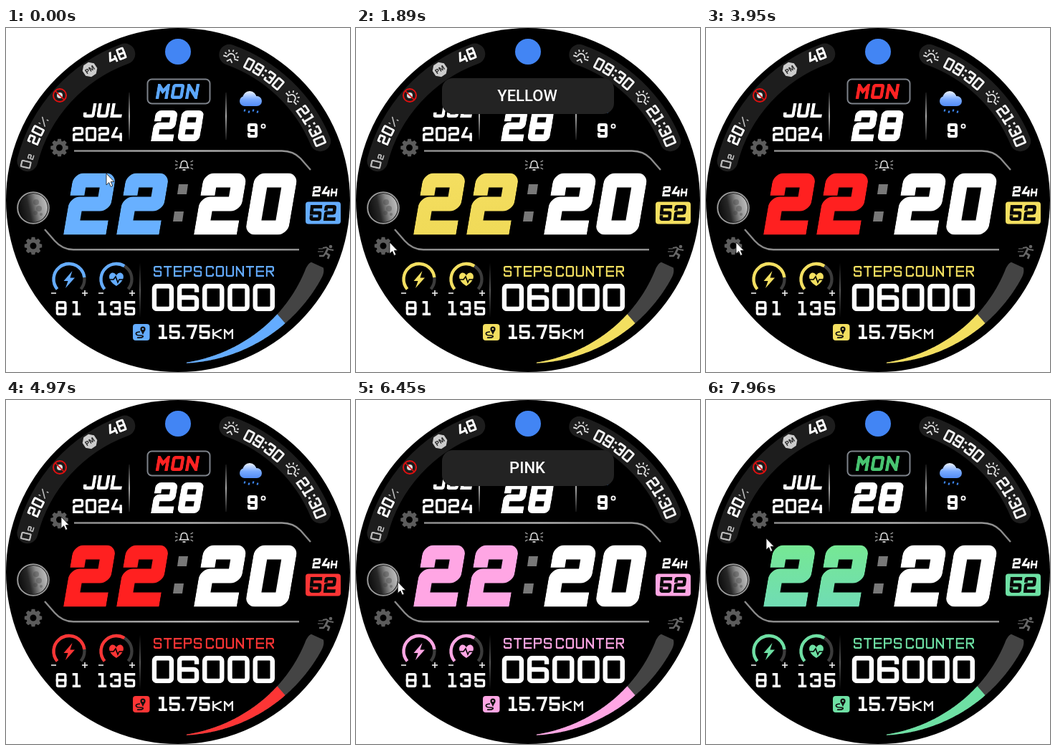
Write an HTML page with a canvas that moves like this. It is 480 px wide and 480 px high and loops after 8 s.

```html
<!DOCTYPE html>
<html lang="en">
<head>
<meta charset="utf-8">
<title>Watch face</title>
<style>
html, body { margin: 0; width: 100%; height: 100%; overflow: hidden; background: #fff; }
canvas { display: block; width: 480px; height: 480px; }
</style>
</head>
<body>
<canvas id="face" width="480" height="480"></canvas>
<script>
const ctx = document.getElementById('face').getContext('2d');
const LOOP = 8000, TAU = Math.PI * 2, RAD = Math.PI / 180;

// Each theme: clock top, clock bottom, weekday, accent.
const THEMES = {
  blue: ['#68b0ff', '#68b0ff', '#5ba6fa', '#64acff'],
  yellow: ['#f4de60', '#f0da58', '#f2dc5c', '#f3df60'],
  red: ['#ff2020', '#ff2020', '#ff2222', '#fd3535'],
  pink: ['#ffa6e4', '#ffa6e4', '#f7a4e2', '#ffa6e4'],
  green: ['#76e894', '#70dcb4', '#48c470', '#6ee0a4']
};
const CLOCK = [[0, 'blue'], [670, 'yellow'], [3050, 'red'], [5030, 'pink'], [6750, 'green']];
const ACCENT = [[0, 'blue'], [1890, 'yellow'], [4010, 'red'], [5890, 'pink'], [7500, 'green']];
const TOAST = [[0, ''], [730, 'YELLOW'], [2990, ''], [3050, 'RED'], [3950, ''], [4010, 'RED'],
  [4970, ''], [5030, 'PINK'], [5830, ''], [5890, 'PINK'], [6690, ''], [6750, 'GREEN'],
  [7440, ''], [7500, 'GREEN'], [7960, '']];
const POINTER = [[0, 140, 203], [60, 140, 203], [310, 78, 169], [1050, 78, 168], [1450, 42, 225],
  [1830, 47, 299], [2130, 47, 299], [2450, 104, 220], [2870, 74, 153], [3230, 74, 153],
  [3770, 42, 299], [4190, 42, 299], [4670, 64, 152], [4790, 77, 157], [4970, 77, 163],
  [5210, 77, 163], [5770, 37, 302], [5890, 37, 302], [6130, 48, 290], [6310, 48, 290],
  [6690, 81, 173], [7110, 81, 173], [7400, 38, 298], [7600, 38, 298], [7960, 84, 193]];

// Pen strokes over a 3x3 keypad; a-f are extra stops on the sides, "!" keeps a corner square.
const GLYPHS = {
  0: '239712', 1: '12!8 79', 2: 'a13647!9', 3: 'a1397c 56', 4: '2e!f 69', 5: '31!4!697c',
  6: 'b317964', 7: '13!8', 8: '239712 46', 9: 'c793146', C: 'b3179d', E: '31!7!9 46',
  H: '17 39 46', J: '397c', K: '17 34!9', L: '17!9', M: '71!5!3!9', N: '71!9!3', O: '239712',
  P: '71!364', R: '71!364 59', S: 'b314697c', T: '13 28', U: '1793', '%': '37 1a 9d'
};
const SIDES = { a: [0, .17], b: [1, .17], c: [0, .83], d: [1, .83], e: [0, .72], f: [1, .72] };
const node = k => SIDES[k] || [(k - 1) % 3 / 2, Math.floor((k - 1) / 3) / 2];

const valueAt = (list, t) => list.filter(e => e[0] <= t).pop()[1];

function placed(x, y, angle, draw) {
  ctx.save();
  ctx.translate(x, y);
  ctx.rotate(angle * RAD);
  draw();
  ctx.restore();
}

function line(points, color, width) {
  ctx.beginPath();
  points.forEach(p => ctx.lineTo(p[0], p[1]));
  ctx.strokeStyle = color;
  ctx.lineWidth = width;
  ctx.stroke();
}

function shape(points, color) {
  ctx.beginPath();
  points.forEach(p => ctx.lineTo(p[0], p[1]));
  ctx.fillStyle = color;
  ctx.fill();
}

function disc(x, y, r, color) {
  ctx.beginPath();
  ctx.arc(x, y, r, 0, TAU);
  ctx.fillStyle = color;
  ctx.fill();
}

function arc(x, y, r, from, to, color, width) {
  ctx.beginPath();
  ctx.arc(x, y, r, from * RAD, to * RAD);
  ctx.strokeStyle = color;
  ctx.lineWidth = width;
  ctx.stroke();
}

function box(x, y, w, h, r, color) {
  ctx.beginPath();
  ctx.roundRect(x, y, w, h, r);
  ctx.fillStyle = color;
  ctx.fill();
}

function fade(x0, y0, x1, y1, ...stops) {
  const g = ctx.createLinearGradient(x0, y0, x1, y1);
  stops.forEach((c, i) => g.addColorStop(i / (stops.length - 1), c));
  return g;
}

function glyphWidth(c, w, pen) {
  if (c === ' ') return 0;
  return c === '.' || c === ':' ? pen : c === '1' ? w * .78 : w;
}

// Draws a glyph with its lower left corner at the origin.
function glyph(c, w, h, pen, color) {
  ctx.fillStyle = color;
  if (c === '.') ctx.fillRect(0, -pen, pen, pen);
  if (c === ':') [.2, .65].forEach(k => ctx.fillRect(0, -h * k - pen, pen, pen));
  if (!GLYPHS[c]) return;
  const width = glyphWidth(c, w, pen), radius = Math.max(.5, w * .24 - pen / 2);
  ctx.save();
  ctx.beginPath();
  ctx.rect(0, -h, width, h);
  ctx.clip();
  ctx.strokeStyle = color;
  ctx.lineWidth = pen;
  ctx.lineCap = 'square';
  for (const stroke of GLYPHS[c].split(' ')) {
    const stops = stroke.match(/.!?/g);
    const pts = stops.map(s => node(s[0]))
      .map(([u, v]) => [pen / 2 + u * (width - pen), -h + pen / 2 + v * (h - pen)]);
    ctx.beginPath();
    pts.forEach((p, i) => {
      const round = i > 0 && i < pts.length - 1 && !stops[i][1];
      if (round) ctx.arcTo(...p, ...pts[i + 1], radius);
      else ctx.lineTo(...p);
    });
    ctx.stroke();
  }
  ctx.restore();
}

function text(s, x, base, w, h, gap, pen, color, slant = 0) {
  ctx.save();
  ctx.transform(1, 0, -slant, 1, x, base);
  for (const c of s) {
    glyph(c, w, h, pen, color);
    ctx.translate(glyphWidth(c, w, pen) + gap, 0);
  }
  ctx.restore();
}

// Text centred on an angle of the bezel, each glyph turned with the arc.
function bezelText(s, angle, r, w, h, gap, pen, color) {
  const widths = [...s].map(c => glyphWidth(c, w, pen) + gap);
  let pos = -widths.reduce((a, b) => a + b) / 2;
  [...s].forEach((c, i) => {
    const a = angle + (pos + widths[i] / 2) / r / RAD;
    placed(240 + r * Math.cos(a * RAD), 240 + r * Math.sin(a * RAD), a + 90, () => {
      ctx.translate(-(widths[i] - gap) / 2, h / 2);
      glyph(c, w, h, pen, color);
    });
    pos += widths[i];
  });
}

function gear(x, y) {
  placed(x, y, 0, () => {
    for (let i = 0; i < 8; i++) {
      ctx.rotate(TAU / 8);
      shape([[-3.2, -8], [-2.3, -12.2], [2.3, -12.2], [3.2, -8]], '#5c5c5c');
    }
    arc(0, 0, 7, 0, 360, '#5c5c5c', 5);
  });
}

function sun(x, y, angle, dir) {
  placed(x, y, angle, () => {
    arc(0, 3, 5, 180, 360, '#ddd', 2);
    line([[-11, 4], [-5, 4]], '#ddd', 2);
    line([[5, 4], [11, 4]], '#ddd', 2);
    line([[-4, 8 - dir], [0, 8 + dir], [4, 8 - dir]], '#ddd', 1.8);
    for (let a = 200; a <= 340; a += 35) {
      const c = Math.cos(a * RAD), s = Math.sin(a * RAD);
      line([[c * 8, 3 + s * 8], [c * 11, 3 + s * 11]], '#ddd', 1.8);
    }
  });
}

function bezel() {
  ctx.lineCap = 'round';
  arc(240, 240, 217, 194.5, 250, '#1d1d1d', 29);
  arc(240, 240, 215, 289.5, 337.5, '#1d1d1d', 29);
  ctx.lineCap = 'butt';
  bezelText('48', 247, 219, 11.5, 17, 2.5, 3, '#fff');
  bezelText('20', 204.5, 218, 11.5, 17, 2.5, 3, '#fff');
  bezelText('%', 210.2, 217, 11, 11, 1, 1.6, '#bbb');
  bezelText('O', 193.2, 218, 11, 15, 1, 2.4, '#bbb');
  bezelText('2', 196.3, 214, 7, 9, 1, 1.8, '#bbb');
  bezelText('09:30', 304.2, 214, 12.3, 17, 2.2, 3, '#f2f2f2');
  bezelText('21:30', 331, 214, 12.6, 17, 2.5, 3, '#f2f2f2');
  sun(315, 38, 19, -2);
  sun(401, 96, 48, 2);

  placed(117, 58, -34, () => {
    const octagon = [...Array(8)].map((_, i) => (i + .5) * TAU / 8)
      .map(a => [10.5 * Math.cos(a), 10.5 * Math.sin(a)]);
    shape(octagon, '#ccc');
    ctx.fillStyle = '#222';
    ctx.font = 'bold 9px Roboto, sans-serif';
    ctx.fillText('PM', 0, .5);
  });

  disc(75, 94, 4, '#ddd');
  arc(75, 94, 9, 0, 360, '#e01010', 2);
  line([[69, 88], [81, 100]], '#e01010', 1.7);
  disc(240, 33, 18, '#4285f4');
}

function weather() {
  ctx.beginPath();
  ctx.arc(333, 102, 7, 0, TAU);
  ctx.arc(340, 97.5, 9.5, 0, TAU);
  ctx.arc(350, 102, 7, 0, TAU);
  ctx.rect(333, 101, 17, 8);
  ctx.fillStyle = fade(0, 88, 0, 111, '#eef4ff', '#79aaff', '#4b86f5');
  ctx.fill();
  [[333, 115], [339, 117], [345, 115], [351, 117]]
    .forEach(([x, y]) => line([[x + .5, y - 1.5], [x - .5, y + 1.5]], '#3d86f0', 2.2));
  text('9', 337, 153, 14, 20, 0, 4, '#fff');
  arc(359, 137, 2.6, 0, 360, '#fff', 1.8);
}

function bell() {
  ctx.beginPath();
  ctx.moveTo(242.5, 195);
  ctx.quadraticCurveTo(244.5, 193, 244.3, 189.5);
  ctx.bezierCurveTo(244.5, 184, 252.5, 184, 252.7, 189.5);
  ctx.quadraticCurveTo(252.5, 193, 254.5, 195);
  ctx.closePath();
  ctx.strokeStyle = '#ddd';
  ctx.lineWidth = 1.5;
  ctx.stroke();
  line([[246.5, 198], [250.5, 198]], '#ddd', 1.8);
  for (const side of [-1, 1])
    for (const dy of [-5, 0, 5])
      line([[248.5 + side * 9, 191 + dy * .8], [248.5 + side * 12.5, 191 + dy * 1.2]], '#aaa', 1.4);
}

function frameLines() {
  ctx.lineWidth = 2.4;
  ctx.strokeStyle = fade(92, 0, 426, 0, '#8a8a8a', '#b0b0b0', '#8a8a8a');
  ctx.beginPath();
  ctx.moveTo(95, 171.5);
  ctx.lineTo(385, 171.5);
  ctx.quadraticCurveTo(401, 171.5, 411, 182);
  ctx.lineTo(425, 198);
  ctx.stroke();
  ctx.beginPath();
  ctx.moveTo(54, 281);
  ctx.lineTo(68, 297);
  ctx.quadraticCurveTo(79, 309.3, 94, 309.3);
  ctx.lineTo(409, 309.3);
  ctx.stroke();
  for (const x of [172, 307])
    line([[x, 90], [x, 156]], fade(0, 90, 0, 156, '#111', '#aaa', '#111'), 2);
  line([[187, 328], [187, 404]], fade(0, 328, 0, 404, '#000', '#555', '#000'), 2);
}

function moon() {
  disc(38, 251, 20, fade(20, 255, 56, 247, '#101010', '#282828', '#8c8c8c', '#b8b8b8'));
  [[42, 243, 4], [46, 252, 4], [41, 258, 3], [49, 260, 2]]
    .forEach(([x, y, r]) => disc(x, y, r, 'rgba(60,60,60,.35)'));
  arc(38, 251, 21.8, 0, 360, '#999', 2);
}

function runner() {
  disc(453, 305, 2.3, '#666');
  ctx.lineJoin = 'round';
  line([[442, 307], [447, 306], [451, 309], [457, 310]], '#666', 2);
  line([[449, 308], [446, 314], [451, 317], [449, 322]], '#666', 2.8);
  line([[446, 314], [443, 318], [437, 318]], '#666', 2.4);
  [[436, 308, 442], [435, 312, 443]].forEach(([a, y, b]) => line([[a, y], [b, y]], '#555', 1.4));
  ctx.lineJoin = 'miter';
}

function gauge(x, share, color) {
  const from = 140, sweep = 260;
  arc(x, 350.5, 21.5, from, from + sweep, '#3c3c3c', 4.3);
  arc(x, 350.5, 21.5, from, from + sweep * share, color, 4.3);
  line([[x - 25, 370], [x - 18, 370]], '#eee', 1.6);
  line([[x + 18, 370], [x + 26, 370]], '#eee', 1.6);
  line([[x + 22, 366], [x + 22, 374]], '#eee', 1.6);
}

function heart(x, y, color) {
  ctx.beginPath();
  ctx.moveTo(x, y + 9);
  ctx.bezierCurveTo(x - 19, y - 3, x - 6, y - 16, x, y - 6);
  ctx.bezierCurveTo(x + 6, y - 16, x + 19, y - 3, x, y + 9);
  ctx.fillStyle = color;
  ctx.fill();
  line([[x - 11, y], [x - 4, y], [x - 1, y - 4], [x + 2, y + 4], [x + 4, y], [x + 11, y]], '#000', 1.6);
}

// Crescent that widens from its thin tip at 87 degrees to a rounded end.
function crescent(to, color) {
  const outer = [], inner = [];
  for (let a = 87; a >= to; a -= .5) {
    const c = Math.cos(a * RAD), s = Math.sin(a * RAD);
    const u = Math.max(0, (28.5 - a) / 4);
    const tip = 8 * (1 - Math.sqrt(1 - u * u));
    const far = 228 - tip, near = 227 - (87 - a) / 62 * 26 + tip;
    outer.push([240 + far * c, 240 + far * s]);
    inner.unshift([240 + near * c, 240 + near * s]);
  }
  shape(outer.concat(inner), color);
}

function routeIcon(color) {
  box(177, 413, 23.5, 23, 4, color);
  disc(191, 420, 3.6, '#111');
  shape([[187.6, 421], [194.4, 421], [191, 428]], '#111');
  disc(191, 420, 1.3, color);
  ctx.beginPath();
  ctx.moveTo(187, 424);
  ctx.bezierCurveTo(179, 424, 180, 429, 187, 429);
  ctx.bezierCurveTo(194, 429, 192, 433, 183, 432);
  ctx.strokeStyle = '#111';
  ctx.lineWidth = 1.7;
  ctx.stroke();
}

function upper(theme) {
  box(197.5, 71.5, 87, 34, 6, '#000');
  ctx.strokeStyle = '#7d828a';
  ctx.lineWidth = 2;
  ctx.stroke();
  text('MON', 208.5, 99, 17.2, 21, 3.4, 4.6, theme[2], .17);
  text('JUL', 107, 125, 16.3, 20, 2.7, 4.5, '#fff', .17);
  text('2024', 93, 158, 15.2, 20, 2.7, 3.5, '#fff');
  text('28', 202, 158, 31, 43, 5.5, 9.5, '#fff', .17);
  weather();
  bell();
  text('22', 80, 288.5, 59.5, 86, 14.5, 20, fade(0, -86, 0, 0, theme[0], theme[1]), .17);
  text('20', 262, 288.5, 60, 86, 11, 20, '#fff', .17);
  for (const [x, y] of [[239, 218], [233, 256]])
    shape([[x + 2, y], [x + 15, y], [x + 13, y + 14], [x, y + 14]], '#787878');
}

function lower(color) {
  text('24', 427, 235, 11, 14.5, 2, 3, '#fff', .12);
  text('H', 452.5, 235, 9, 11, 0, 2.4, '#fff', .12);
  box(418, 242.5, 49, 31, 4, color);
  text('52', 423, 269, 16.8, 22, 3, 4.8, '#080808', .08);

  gauge(88, .82, color);
  gauge(154, .62, color);
  shape([[92.5, 339], [80.5, 353], [86.5, 353], [83, 363], [96, 348.5], [89.5, 348.5]], color);
  heart(154, 351, color);
  text('81', 69.5, 401, 15.2, 20, 7.8, 3.5, '#fff');
  text('135', 128.5, 401, 15.4, 20, 4.6, 3.5, '#fff');

  text('STEPS COUNTER', 206, 347, 11.4, 15, 2.6, 2.2, color);
  text('06000', 203.5, 395.3, 30.8, 38.5, 4.4, 6.6, '#fff');
  routeIcon(color);
  text('15.75', 213, 434, 15.3, 20, 2.6, 3.5, '#fff');
  text('KM', 288, 434, 13, 14, 3, 2.3, '#eee');
  crescent(25, '#444');
  crescent(49, color);
}

function toast(label) {
  if (!label) return;
  box(120, 70, 240, 50, 15, '#232323');
  ctx.fillStyle = '#fff';
  ctx.font = '500 22px Roboto, sans-serif';
  ctx.fillText(label, 239, 95.5);
}

function pointer(t) {
  let i = POINTER.findIndex(k => k[0] > t);
  if (i < 0) i = POINTER.length - 1;
  const [t0, x0, y0] = POINTER[i - 1], [t1, x1, y1] = POINTER[i];
  const u = Math.min(1, (t - t0) / (t1 - t0)), e = u * u * (3 - 2 * u);
  placed(x0 + (x1 - x0) * e, y0 + (y1 - y0) * e, 0, () => {
    shape([[0, 0], [0, 16], [3.7, 12.6], [6.2, 18.4], [8.8, 17.3], [6.3, 11.6], [11, 11.6]], '#fff');
    ctx.closePath();
    ctx.strokeStyle = '#111';
    ctx.lineWidth = .8;
    ctx.stroke();
  });
}

function draw(t) {
  ctx.textAlign = 'center';
  ctx.textBaseline = 'middle';
  ctx.fillStyle = '#fff';
  ctx.fillRect(0, 0, 480, 480);
  disc(240, 240, 240, '#000');
  bezel();
  frameLines();
  moon();
  gear(74.5, 167);
  gear(38, 304);
  runner();
  upper(THEMES[valueAt(CLOCK, t)]);
  lower(THEMES[valueAt(ACCENT, t)][3]);
  toast(valueAt(TOAST, t));
  pointer(t);
}

const start = performance.now();
function tick() {
  draw((performance.now() - start) % LOOP);
  requestAnimationFrame(tick);
}
tick();
</script>
</body>
</html>
```
